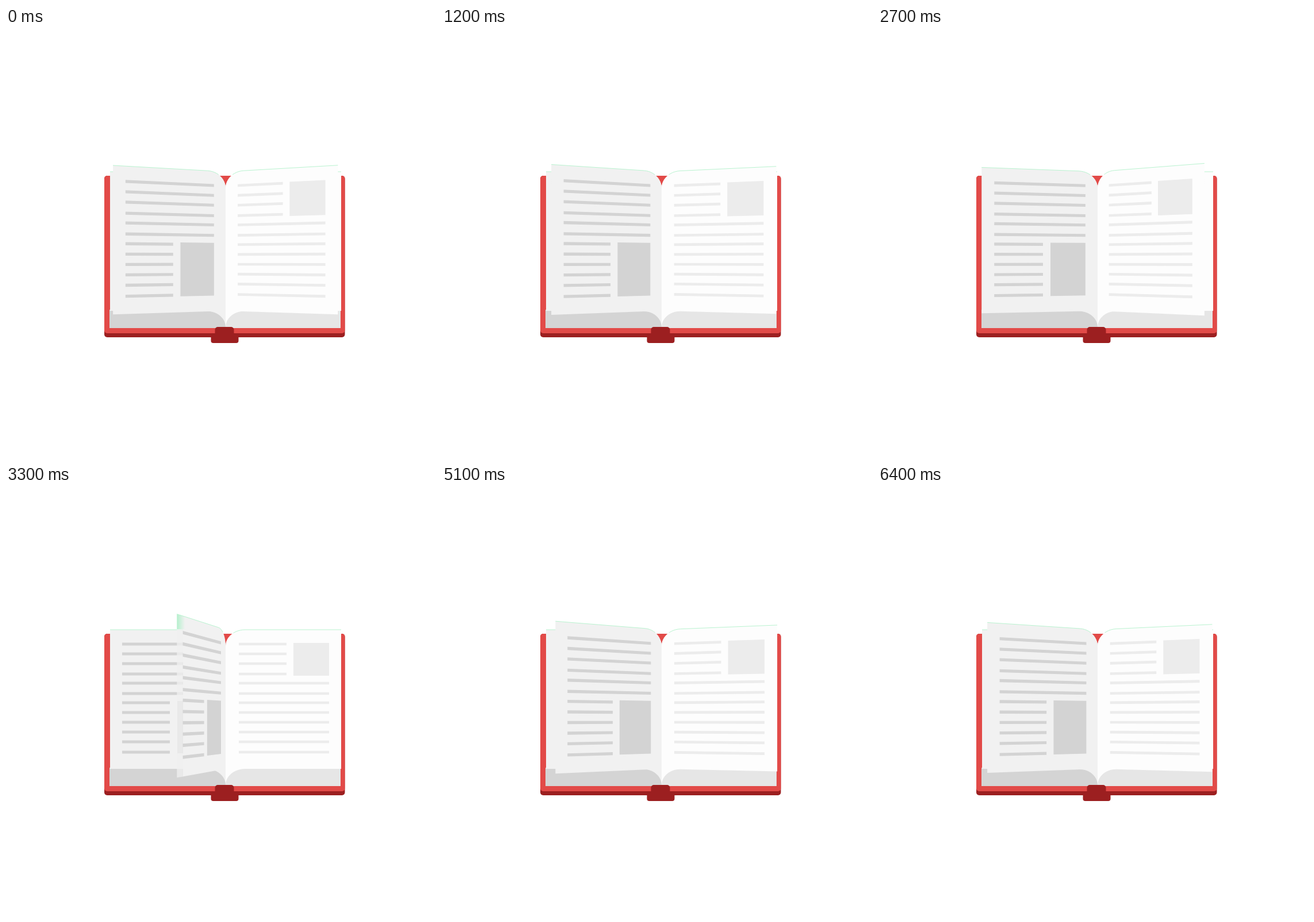
An HTML page with a canvas that plays this animation: 748x748 px, repeating every 6510 ms.

```html
<!DOCTYPE html>
<html>
<head>
<meta charset="utf-8">
<style>
html, body { margin: 0; height: 100%; overflow: hidden; background: #fff; }
canvas { display: block; width: 100vw; height: 100vh; }
</style>
</head>
<body>
<canvas id="stage" width="748" height="748"></canvas>
<script>
const ctx = document.getElementById('stage').getContext('2d');
const LOOP = 6510, STEP = 100, TURN = 12.75;
const SPINE = 382, EYE = 405, WIDTH = 201, DEPTH = 0.16;
const ROWS = [275, 292, 309, 327, 343, 361, 377, 394, 411, 428, 445, 463];

// Page angle in degrees against steps since the start of a turn.
const KEYS = [[-5, 0], [-4.5, 7], [-1, 18], [-0.75, 20.6], [0, 25], [3.5, 42], [4.75, 65],
  [7.5, 111], [8.25, 131], [9, 136], [11.75, 147], [12, 152], [12.75, 155.5], [17.5, 180]];

function angleAt(u) {
  const i = KEYS.findIndex(k => k[0] > u);
  if (i < 1) return null;
  const [u0, a0] = KEYS[i - 1], [u1, a1] = KEYS[i];
  return (a0 + (a1 - a0) * (u - u0) / (u1 - u0)) * Math.PI / 180;
}

// Perspective of a sheet hinged at the spine: r is the distance from it.
function project(r, y, angle) {
  const s = 1 / (1 - DEPTH * Math.sin(angle) * r / WIDTH);
  return [SPINE + r * Math.cos(angle) * s, EYE + (y - EYE) * s];
}

function trace(points, angle) {
  ctx.beginPath();
  for (const [r, y] of points) ctx.lineTo(...project(r, y, angle));
}

function fill(points, angle, color) {
  trace(points, angle);
  ctx.closePath();
  ctx.fillStyle = color;
  ctx.fill();
}

const box = (r0, y0, r1, y1) => [[r0, y0], [r1, y0], [r1, y1], [r0, y1]];

// Rounded inner corner, from the spine outwards.
function corner(y) {
  return Array.from({ length: 13 }, (_, i) => {
    const a = i / 12 * Math.PI / 2;
    return [34 * (1 - Math.cos(a)), y - 28 * Math.sin(a)];
  });
}
const sheet = edge => [...corner(278), [edge, 250], [edge, 492], ...corner(520).reverse()];

function page(angle) {
  const left = angle > Math.PI / 2;
  const paper = left ? '#f1f1f1' : '#fdfdfd';
  const ink = left ? '#d3d3d3' : '#ececec';
  const steep = Math.max(0, Math.sin(angle) - 0.6) / 0.4;

  // The outer strip turns translucent while the page moves fast.
  if (steep) {
    const rim = WIDTH - 21 * Math.min(1, steep * 1.5);
    fill(sheet(rim), angle, paper);
    ctx.globalAlpha = left ? 0.75 : 0.25;
    fill(box(rim, 250, WIDTH, 492), angle, paper);
    ctx.globalAlpha = 1;
    ctx.save();
    ctx.beginPath();
    ctx.rect(0, 0, 748, 249);
    ctx.clip();
    const g = ctx.createLinearGradient(project(WIDTH, 250, angle)[0], 0, project(172, 250, angle)[0], 0);
    g.addColorStop(0, '#b4f0cc');
    g.addColorStop(1, paper);
    fill(box(172, 250, WIDTH, 492), angle, g);
    ctx.restore();
  } else {
    fill(sheet(WIDTH), angle, paper);
  }

  trace([...corner(278).slice(7), [WIDTH, 250]], angle);
  ctx.strokeStyle = '#b9f3d0';
  ctx.lineWidth = 1;
  ctx.stroke();

  const half = left ? 2.5 : 2.3;
  ROWS.forEach((y, i) => {
    const from = left && i > 5 ? 97 : left ? 22 : 23;
    const to = !left && i < 4 ? 106 : 180;
    fill(box(from, y - half, to, y + half), angle, ink);
  });
  fill(left ? box(22, 374, 84, 465) : box(118, 273, 180, 330), angle, ink);
}

function bar(x, y, w, h, radius, color) {
  ctx.beginPath();
  ctx.roundRect(x, y, w, h, radius);
  ctx.fillStyle = color;
  ctx.fill();
}

function draw(step) {
  ctx.fillStyle = '#fff';
  ctx.fillRect(0, 0, 748, 748);

  // Cover and page block
  bar(171, 257, 418.5, 281, 5, '#9c1f20');
  bar(171, 257, 418.5, 274, 5, '#e24a48');
  bar(180, 490, 202, 32, 0, '#d4d4d4');
  bar(382, 490, 200, 32, 0, '#e6e6e6');

  page(Math.PI);
  page(0);
  const held = step < 40 ? step : step - 1;
  const u = held % TURN;
  for (const k of [1, 0, -1]) {
    const angle = angleAt(u + k * TURN);
    if (angle !== null) page(angle);
  }

  // Spine tab
  bar(363.5, 520, 33, 20, 5, '#9c1f20');
  bar(356.5, 531, 48, 17, 4, '#9c1f20');
}

function tick(now) {
  draw(Math.min(64, Math.floor(now % LOOP / STEP)));
  requestAnimationFrame(tick);
}
draw(0);
requestAnimationFrame(tick);
</script>
</body>
</html>
```
